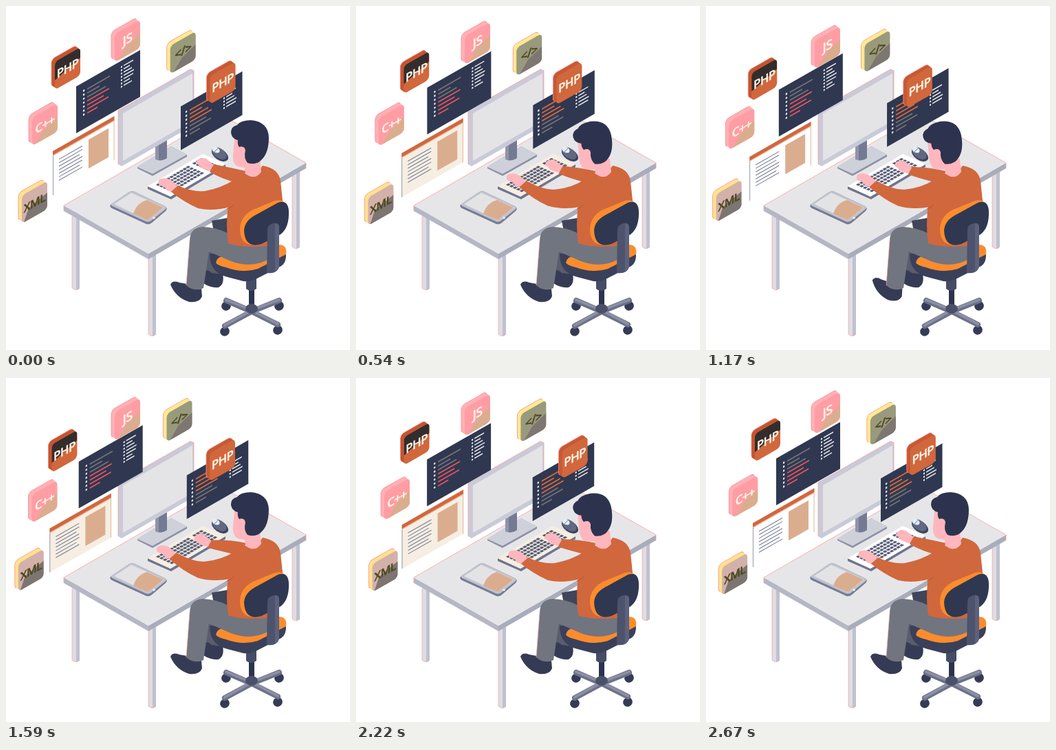
Animation of 500 by 500 pixels, one loop 2700 ms. Source, as an HTML page with a canvas:

```html
<!DOCTYPE html>
<html lang="en">
<head>
<meta charset="utf-8">
<title>Developer at work</title>
<style>
  html, body { margin: 0; width: 100%; height: 100%; overflow: hidden; background: #fff; }
  canvas { display: block; width: 500px; height: 500px; }
</style>
</head>
<body>
<canvas id="stage" width="500" height="500"></canvas>
<script>
const ctx = document.getElementById('stage').getContext('2d');
const LOOP = 2700, STEP = 30, TAU = Math.PI * 2, SLOPE = -0.57;
const C = {
  navy: '#2f3850', shoe: '#363b55', orange: '#d1673d', bright: '#fb8c2e', skin: '#ffb6bd',
  pink: '#ff9da4', tan: '#dbad8f', cream: '#f6eee2', trousers: '#71757f', fringe: '#ff9c9c',
  top: '#e6e6e8', edge: '#a9acba', olive: '#4d481b', slate: '#4d536d'
};

const ramp = (t, a, b) => {
  const k = Math.min(1, Math.max(0, (t - a) / (b - a)));
  return k * k * (3 - 2 * k);
};
const swing = (t, period = LOOP) => (1 - Math.cos(TAU * t / period)) / 2;
const wave = (t, peak) => Math.cos(TAU * (t - peak) / LOOP);

function shape(d, fill, stroke, width = 1) {
  const p = new Path2D(d);
  if (fill) { ctx.fillStyle = fill; ctx.fill(p); }
  if (stroke) { ctx.strokeStyle = stroke; ctx.lineWidth = width; ctx.stroke(p); }
}
function rect(x, y, w, h, fill) {
  ctx.fillStyle = fill;
  ctx.fillRect(x, y, w, h);
}
function oval(x, y, rx, ry, turn, fill) {
  ctx.beginPath();
  ctx.ellipse(x, y, rx, ry, turn, 0, TAU);
  ctx.fillStyle = fill;
  ctx.fill();
}
function placed(x, y, draw) {
  ctx.save();
  ctx.translate(x, y);
  draw();
  ctx.restore();
}
function wall(x, y, draw) {
  ctx.save();
  ctx.transform(1, SLOPE, 0, 1, x, y);
  draw();
  ctx.restore();
}
function turned(x, y, angle, draw) {
  ctx.save();
  ctx.translate(x, y);
  ctx.rotate(angle);
  ctx.translate(-x, -y);
  draw();
  ctx.restore();
}

function deskLeg(x, y, h) {
  shape(`M${x} ${y}h11v${h - 3}q-5 5-11 0z`, '#dddde4');
  shape(`M${x + 6} ${y}h5v${h - 3}q-2 3-5 3z`, '#bfc1cf');
  shape(`M${x} ${y + 8}v${h - 11}q5 5 11 0`, null, C.fringe, 0.7);
}

function desk() {
  deskLeg(96, 298, 115);
  deskLeg(416, 238, 115);
  deskLeg(207, 360, 120);
  shape('M84 290L207 360V368L84 298Z', '#b5b7c5');
  shape('M207 360L436 228V236L207 368Z', C.edge);
  shape('M84 290L313 158L436 228L207 360Z', C.top);
  shape('M84 298V290L313 158L436 228V236', null, C.fringe, 0.8);
}

function monitor() {
  shape('M191 234L240 204L263 216V219L213 247L191 236Z', '#8d91a6');
  shape('M191 234L240 204L263 216L213 244Z', '#cfd1da');
  shape('M217 198L234 190V221Q226 227 217 223Z', '#9093aa');
  shape('M222 198L234 192V221Q228 225 222 224Z', '#757a94');
  shape('M163 152L268 92L273 94V173L168 233L163 230Z', '#c9cad7');
  shape('M170 156L271 98V167L170 225Z', '#e4e4e7');
  shape('M163 230V152L268 92L273 94V173', null, C.fringe, 0.8);
}

function keyboard(paper) {
  shape('M206 262L239 277L319 230V234L240 281L206 266Z', '#6f758d');
  shape('M206 262L286 215L319 230L239 277Z', paper);
  ctx.save();
  ctx.transform(80, -47, 33, 15, 206, 262);
  for (let row = 0; row < 5; row++) {
    for (let col = 0; col < 14; col++) {
      if (col !== 10) rect(0.09 + col * 0.06, 0.14 + row * 0.15, 0.047, 0.105, '#555b75');
    }
  }
  ctx.restore();
}

function deskItems(paper) {
  oval(311, 216, 13.5, 8, 0.6, '#3d4460');
  oval(310, 214, 12, 7, 0.6, '#626880');
  oval(305, 209, 6, 4, 0.5, '#e6edf5');
  shape('M303 212L309 206', null, '#4a83b5', 1);
  keyboard(paper);
  shape('M153 288L178 271Q182 268 187 270L231 291Q236 294 232 298L212 315Q207 319 202 316L154 294Q149 291 153 288Z', '#777c94');
  shape('M154 287L178 271Q182 268 187 270L231 291Q235 293 231 296L211 312Q207 315 203 313L155 291Q151 289 154 287Z', '#c0c3ce');
  shape('M157 288L182 271.5L230 293L206 311Z', '#e3e3e5');
  shape('M185 302Q190 286 205 282L229 293L206 311Z', C.tan);
  oval(215, 308, 2, 1.4, 0, '#f0f0f4');
}

function documentPanel(t, paper) {
  const k = swing(t);
  wall(68 - 5 * k, 211 + 8.5 * k, () => {
    rect(0, 0, 89.5, 64, paper);
    rect(0, 0, 89.5, 6, C.orange);
    rect(0, 6, 89.5, 1.2, '#e9b49a');
    rect(0, 7, 0.9, 57, '#8b8d9c');
    rect(88.6, 6, 0.9, 58, C.tan);
    for (let i = 0; i < 7; i++) rect(9, 16.3 + i * 5.1, i % 3 === 2 ? 30 : 34, 1.2, '#747b93');
    rect(52, 13, 29, 42, C.tan);
  });
}

function codePanel(x, y, w, h, left, tint, tinted, side) {
  const widths = [33, 18, 27, 32, 24, 31, 15];
  wall(x, y, () => {
    rect(0, 0, w, h, C.navy);
    widths.forEach((len, i) => {
      const row = 11 + i * 5.8;
      rect(left, row, 2.2, 2.6, '#f3f3f5');
      rect(left + 6, row + 0.8, len, 2, tinted(i) ? tint : '#777278');
    });
    for (let i = 0; i < side.rows; i++) {
      const row = side.y + i * 4.8;
      rect(side.x, row, 2, 2.2, '#fff');
      rect(side.x + 4, row, [14, 9, 12, 15][i % 4], 1.7, '#e9e9ec');
    }
  });
}

function codePanels(t) {
  const k = swing(t);
  codePanel(102 + 4 * k, 117 + 5 * k, 93, 68, 10, '#e4565f', i => i > 2, { x: 65, y: 8, rows: 7 });
  codePanel(254 + 9.5 * k, 146 - 5 * k, 89.5, 63.5, 7, '#d96a40', i => i < 4, { x: 62, y: 18, rows: 5 });
}

const LOWER_RIGHT = 'M5 41L17 27L37 19V41Z';

function tile(x, y, look) {
  const face = new Path2D();
  face.roundRect(0, 0, 37, 41, 5.5);
  for (let i = 5; i >= 0; i--) {
    wall(x + 5 - i, y + 24 - i * 0.7, () => {
      ctx.fillStyle = i ? look.side : look.face;
      ctx.fill(face);
      if (i === 5) {
        ctx.strokeStyle = '#ff8b8b';
        ctx.lineWidth = 0.8;
        ctx.stroke(face);
      }
    });
  }
  wall(x + 5, y + 24, () => {
    ctx.save();
    ctx.clip(face);
    if (look.shade) shape(look.shadePath || LOWER_RIGHT, look.shade);
    ctx.restore();
    const ink = look.ink || '#fff5e6';
    ctx.font = `600 ${look.size || 17}px "Open Sans", "Noto Sans", sans-serif`;
    ctx.letterSpacing = '-0.7px';
    ctx.textAlign = 'center';
    ctx.textBaseline = 'alphabetic';
    ctx.lineJoin = 'round';
    ctx.lineWidth = 0.4;
    ctx.fillStyle = ctx.strokeStyle = ink;
    ctx.fillText(look.text, 18.5, (look.middle || 20) + 6);
    ctx.strokeText(look.text, 18.5, (look.middle || 20) + 6);
  });
}

function tiles(t) {
  const k = swing(t);
  const driftX = -4.6 * wave(t, 820), driftY = -4 * wave(t, 210);
  const orbitX = 4.8 * wave(t, 2400), orbitY = 4.8 * wave(t, 500);
  tile(153, 17 + 10 * k, { text: 'JS', face: C.pink, side: '#ffb0b5', shade: C.tan, size: 18, middle: 18 });
  tile(66 - 5 * k, 57 + 17 * k, {
    text: 'PHP', face: C.orange, side: '#c5552f', shade: '#332d2e', shadePath: 'M0 0H37V15L0 27Z'
  });
  tile(31.5 + driftX, 142 + driftY, { text: 'C++', face: C.pink, side: '#ffb0b5', shade: C.tan });
  tile(14.3 + orbitX, 249.5 + orbitY, {
    text: 'XML', face: '#d3b1ab', side: '#ffe28c', shade: '#7c7572',
    shadePath: 'M3 41L10 24L37 17V41Z', ink: C.olive, size: 16, middle: 21
  });
  tile(230 + orbitX, 32 + orbitY, {
    text: '</>', face: '#99997d', side: '#ffe990', shade: '#7d7671', ink: C.olive, middle: 18
  });
  tile(290 + driftX, 81.5 + driftY, { text: 'PHP', face: C.orange, side: '#c65a34' });
}

function chairBase() {
  ctx.lineCap = 'round';
  for (const [x, y] of [[320, 436], [397, 436], [318, 473], [395, 471]]) {
    oval(x, y, 7, 6.5, -0.5, '#353b56');
    shape(`M357 444L${x} ${y - 8}`, null, '#6c7189', 8);
    shape(`M357 442L${x} ${y - 9}`, null, '#8b8fa4', 4);
  }
  ctx.lineCap = 'butt';
  rect(353, 406, 8, 34, '#2d334e');
  oval(357, 440, 9, 7, 0, '#4a506a');
  shape('M349 388H364V411Q356 417 349 411Z', '#464c66');
}

function chairSeat() {
  shape('M296 360Q296 388 322 394L345 400Q355 401 365 396L400 378Q408 373 407 358L350 360Z', '#3a405a');
  shape('M305 373Q308 361 322 365Q345 374 365 367L397 347Q409 347 407 361L366 382Q344 389 320 380Q307 377 305 373Z', C.bright);
}

function chairBack() {
  shape('M340 325Q340 306 359 296L391 283Q402 280 407 288L360 347Q341 348 340 325Z', C.bright);
  shape('M346 326Q347 311 366 302L395 286Q410 281 411 298Q412 322 399 332L371 346Q347 353 346 326Z', C.navy);
  shape('M380 326Q380 318 388 316Q397 314 397 322V379Q394 390 379 388Z', C.slate);
  shape('M391 316Q397 315 397 322V379Q396 384 391 386Z', '#5c627c');
}

function legs(t) {
  shape('M299 312L322 308V336L302 328Z', '#414559');
  shape('M294 350L320 362L310 394L289 390Z', '#5a5e6c');
  shape('M287 385Q293 382 299 388L315 390Q318 404 309 409Q297 410 287 403Z', C.shoe);
  chairSeat();
  const lift = ramp(t, 840, 1110) * (1 - ramp(t, 1230, 1500));
  turned(284, 420, 0.15 * lift, () => {
    shape('M239 405Q242 398 252 402L263 404Q274 413 284 411L285 422Q281 432 266 430Q247 424 239 405Z', C.shoe);
  });
  shape('M267 342Q267 322 286 321Q304 321 324 331L385 343Q392 364 378 370Q354 381 327 371L295 357L287 410Q273 416 262 406Z', C.trousers);
  shape('M267 340L262 406', null, C.fringe, 0.7);
}

function torso(t) {
  const tap = swing(t, 675);
  const reach = ramp(t, 60, 600) * (1 - ramp(t, 1700, 2150));
  const fx = -4 * tap, fy = 7 * tap, nx = -2.5 * reach, ny = -7 * reach;

  placed(fx, fy, () => shape('M302 231L291 222Q283 219 278 224L276 229Q282 231 283 235Q290 239 299 240Z', C.skin));
  shape(`M${302 + fx} ${230 + fy}Q327 235 349 240L340 258Q314 252 ${296 + fx} ${241 + fy}Z`, C.orange);
  shape('M345 242Q360 253 373 232Q396 236 399 254L404 302L386 348Q348 353 323 345Q319 320 323 288L326 258Z', C.orange);
  placed(nx, ny, () => shape('M250 262L240 253Q231 248 223 252Q219 257 224 261Q231 262 234 268L243 271Z', C.skin));
  shape(`M${250 + nx} ${261 + ny}Q272 ${271 + ny / 2} 289 ${269 + ny / 3}Q312 265 333 252L353 266L326 292Q300 ${299 + ny / 3} 279 ${294 + ny / 2}Q257 ${284 + ny / 2} ${240 + nx} ${270 + ny}Z`, C.orange);
  shape('M331 289Q326 294 321 295', null, '#b9552f', 1);
}

function head(t) {
  const beat = t % (LOOP / 2);
  const lean = ramp(beat, 230, 470) * (1 - ramp(beat, 1180, 1320));
  shape('M347 222H369L371 241Q365 250 356 248Q348 246 347 238Z', C.skin);
  turned(358, 249, -0.185 * lean, () => {
    shape('M333 184L330 216Q329 232 340 234L352 236L366 230L362 190Z', C.skin);
    shape('M327 184Q327 175 336 173Q341 166 356 166Q381 168 382 191Q382 213 372 223Q364 232 351 228Q345 221 348 210Q347 203 339 205Q336 201 337 195Q328 193 327 184Z', '#2d334e');
    oval(342, 211, 4.5, 6.5, -0.2, C.skin);
  });
}

function render(t) {
  const bare = t < 150 || t > 2550 || Math.abs(t - 1170) < 90;
  const paper = bare ? '#fff' : C.cream;
  rect(0, 0, 500, 500, '#fff');
  desk();
  monitor();
  deskItems(paper);
  documentPanel(t, paper);
  codePanels(t);
  tiles(t);
  chairBase();
  legs(t);
  torso(t);
  head(t);
  chairBack();
}

const start = performance.now();
function tick() {
  const t = (performance.now() - start) % LOOP;
  render(Math.floor(t / STEP) * STEP);
  requestAnimationFrame(tick);
}
tick();
</script>
</body>
</html>
```
